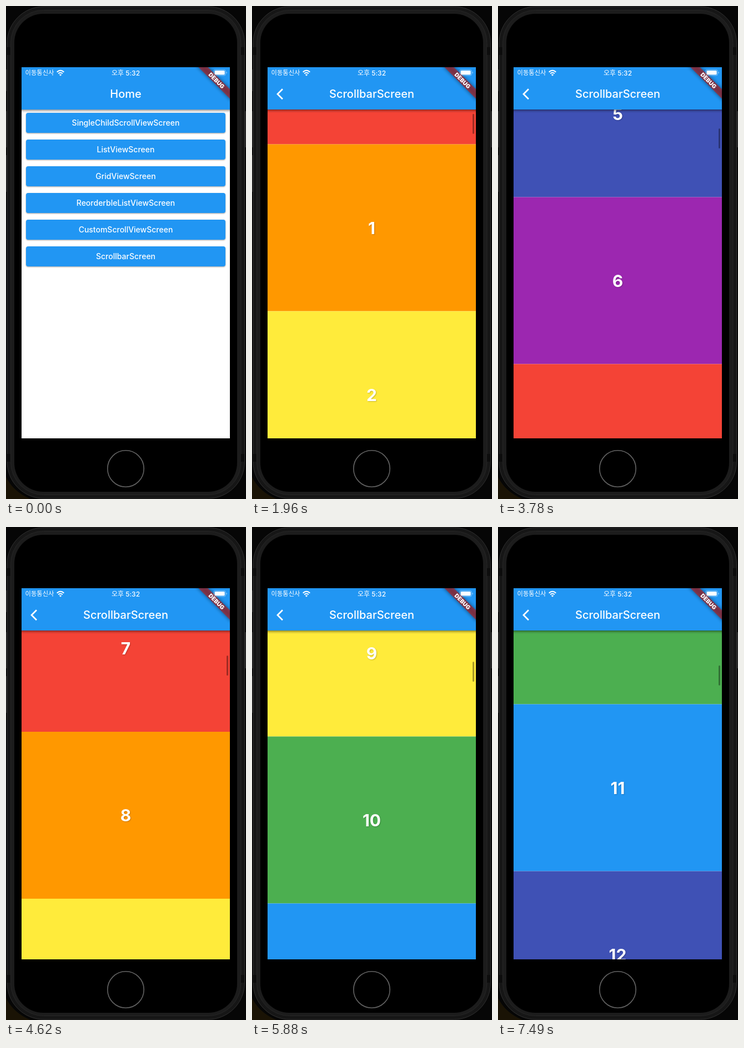
These frames come from a looping animation (432x886 px, 7.56 s). An HTML page:

```html
<!DOCTYPE html>
<html lang="ko">
<head>
<meta charset="utf-8">
<title>Scroll demo</title>
<style>
  html, body { margin: 0; width: 100%; height: 100%; overflow: hidden; background: #060606; }
  svg { display: block; width: 100vw; height: 100vh; }
  text { font-family: Inter, 'Noto Sans CJK KR', 'Noto Sans CJK', sans-serif; fill: #fff; }
  .mid { text-anchor: middle; }
  .title { font-size: 20px; font-weight: 500; }
  .label { font-size: 14px; font-weight: 500; }
  .num { font-size: 30px; font-weight: 700; text-shadow: 1px 1px 2px rgba(0, 0, 0, .22); }
  .btn { fill: #2196f3; filter: drop-shadow(0 1.5px 1.3px rgba(0, 0, 0, .38)); }
</style>
</head>
<body>
<svg viewBox="0 0 432 886" xmlns="http://www.w3.org/2000/svg">
  <defs>
    <linearGradient id="drop" x2="0" y2="1">
      <stop offset="0" stop-opacity=".42"/>
      <stop offset=".4" stop-opacity=".18"/>
      <stop offset="1" stop-opacity="0"/>
    </linearGradient>
    <linearGradient id="edge">
      <stop offset="0" stop-opacity="0"/>
      <stop offset="1" stop-opacity=".14"/>
    </linearGradient>
    <filter id="soft" x="-30%" y="-150%" width="160%" height="400%"><feGaussianBlur stdDeviation="3.5"/></filter>
    <clipPath id="screen"><rect x="28" y="110" width="375" height="667"/></clipPath>
    <clipPath id="body"><rect x="28" y="186" width="375" height="591"/></clipPath>
  </defs>

  <!-- phone -->
  <rect width="432" height="886" fill="#060606"/>
  <path d="M0 846Q12 872 44 886H0z" fill="#1a1305"/>
  <g fill="#262626">
    <rect x="0" y="114" width="3" height="39"/>
    <rect x="0" y="189" width="3" height="65"/>
    <rect x="0" y="268" width="3" height="66"/>
    <rect x="429" y="189" width="3" height="65"/>
  </g>
  <rect x="2" y="1" width="427.5" height="884" rx="66" fill="#161616" stroke="#303030"/>
  <rect x="8.5" y="7.5" width="414.500" height="871" rx="59" fill="#1c1c1c" stroke="#262626"/>
  <g fill="#0d0d0d">
    <rect x="2" y="74" width="6" height="14"/><rect x="423" y="74" width="6" height="14"/>
    <rect x="2" y="805" width="6" height="14"/><rect x="423" y="805" width="6" height="14"/>
  </g>
  <rect x="15" y="14" width="401" height="859" rx="52"/>
  <circle cx="215.500" cy="831.500" r="32.700" fill="none" stroke="#636363" stroke-width="1.600"/>

  <g clip-path="url(#screen)">
    <g id="home"></g>
    <g id="detail">
      <rect x="10" y="110" width="18" height="667" fill="url(#edge)"/>
      <g clip-path="url(#body)">
        <rect x="28" y="186" width="375" height="591" fill="#fafafa"/>
        <g id="list"></g>
        <rect id="thumb" x="397" width="3" height="36" rx="1.5" fill-opacity=".35"/>
      </g>
    </g>

    <!-- corner banner -->
    <g transform="translate(403 110) rotate(45)">
      <rect x="-44" y="28" width="88" height="12" fill-opacity=".5" filter="url(#soft)"/>
      <rect x="-44" y="28" width="88" height="12" fill="#b71c1c" fill-opacity=".627"/>
      <text class="mid" y="37.700" font-size="10.200" font-weight="900">DEBUG</text>
    </g>

    <!-- status bar -->
    <text x="34.500" y="124" font-size="11.300">이동통신사</text>
    <text class="mid" x="215.500" y="124.500" font-size="12" font-weight="500">오후 5:32</text>
    <g fill="none" stroke="#fff" stroke-width="2">
      <path d="M91.700 118.800Q98 112.800 104.300 118.800M94.200 121.500Q98 118 101.800 121.500"/>
      <path d="M95.800 123.400Q98 121.600 100.200 123.400L98 125.700z" fill="#fff" stroke="none"/>
    </g>
    <rect x="373.800" y="114.500" width="21.500" height="10.500" rx="2.800" fill="none" stroke="#fff" stroke-opacity=".4"/>
    <rect x="375.500" y="116" width="18.200" height="7.500" rx="1.500" fill="#fff"/>
    <path d="M396.500 118v3.600q1.500-.6 1.500-1.800t-1.500-1.800" fill="#fff" fill-opacity=".45"/>
  </g>
</svg>
<script>
const LOOP = 7560, STEP = 70;
const PUSH = { start: 860, length: 260 };
const ROW = 300, TOP = 186;
const COLORS = ['#f44336', '#ff9800', '#ffeb3b', '#4caf50', '#2196f3', '#3f51b5', '#9c27b0'];
const SCREENS = ['SingleChildScrollView', 'ListView', 'GridView', 'ReorderbleListView', 'CustomScrollView', 'Scrollbar'];
// time in ms, scroll offset in px
const KNOTS = [[1750, 0], [1960, 237.5], [2870, 842.5], [3780, 1642.5], [5250, 2558], [6440, 2974.5], [7490, 3167.5]];

const $ = id => document.getElementById(id);
const [home, detail, list, thumb] = ['home', 'detail', 'list', 'thumb'].map($);
const clamp = v => Math.min(1, Math.max(0, v));

function add(parent, tag, attrs, text) {
  const el = document.createElementNS('http://www.w3.org/2000/svg', tag);
  for (const key in attrs) el.setAttribute(key, attrs[key]);
  if (text !== undefined) el.textContent = text;
  parent.append(el);
}

function appBar(page, title) {
  add(page, 'rect', { x: 28, y: TOP, width: 375, height: 6, fill: 'url(#drop)' });
  add(page, 'rect', { x: 28, y: 110, width: 375, height: 76, fill: '#2196f3' });
  add(page, 'text', { class: 'mid title', x: 215.5, y: 165 }, title);
}

function build() {
  add(home, 'rect', { x: 28, y: 110, width: 375, height: 667, fill: '#fff' });
  SCREENS.forEach((name, i) => {
    const y = 192 + i * 48;
    add(home, 'rect', { class: 'btn', x: 36, y, width: 359, height: 36, rx: 4 });
    add(home, 'text', { class: 'mid label', x: 215.5, y: y + 22.5 }, name + 'Screen');
  });
  appBar(home, 'Home');

  for (let i = 0; i < 14; i++) {
    const y = TOP + i * ROW;
    add(list, 'rect', { x: 28, y, width: 375, height: ROW, fill: COLORS[i % COLORS.length] });
    add(list, 'text', { class: 'mid num', x: 215.5, y: y + 161 }, i);
  }
  appBar(detail, 'ScrollbarScreen');
  add(detail, 'path', { d: 'M55 149.2L46 158.200L55 167.200', fill: 'none', stroke: '#fff', 'stroke-width': 2.7 });
}

// monotone cubic through the knots
const slopes = KNOTS.slice(1).map(([t, y], i) => (y - KNOTS[i][1]) / (t - KNOTS[i][0]));
const tangents = KNOTS.map((_, i) => {
  const a = slopes[i - 1], b = slopes[i];
  if (a === undefined) return b;
  if (b === undefined) return a * .7;
  return 2 * a * b / (a + b);
});

function scrollAt(t) {
  if (t <= KNOTS[0][0]) return 0;
  let i = 0;
  while (i < KNOTS.length - 2 && t > KNOTS[i + 1][0]) i++;
  const [t0, y0] = KNOTS[i], [t1, y1] = KNOTS[i + 1];
  const h = t1 - t0, u = clamp((t - t0) / h), v = 1 - u;
  return v * v * (1 + 2 * u) * y0 + u * u * (3 - 2 * u) * y1
    + h * u * v * (v * tangents[i] - u * tangents[i + 1]);
}

function draw(t) {
  const p = 1 - (1 - clamp((t - PUSH.start) / PUSH.length)) ** 3.5;
  const scroll = Math.round(scrollAt(t) * 2) / 2;
  home.setAttribute('transform', `translate(${-125 * p} 0)`);
  detail.setAttribute('transform', `translate(${375 * (1 - p)} 0)`);
  detail.setAttribute('visibility', p > 0 ? 'visible' : 'hidden');
  list.setAttribute('transform', `translate(0 ${-scroll})`);
  thumb.setAttribute('y', 189.2 + scroll * .0188);
  thumb.setAttribute('opacity', clamp((t - 1750) / 140));
}

build();
const start = performance.now();
function tick() {
  const t = (performance.now() - start) % LOOP;
  draw(Math.floor(t / STEP) * STEP);
  requestAnimationFrame(tick);
}
tick();
</script>
</body>
</html>
```
